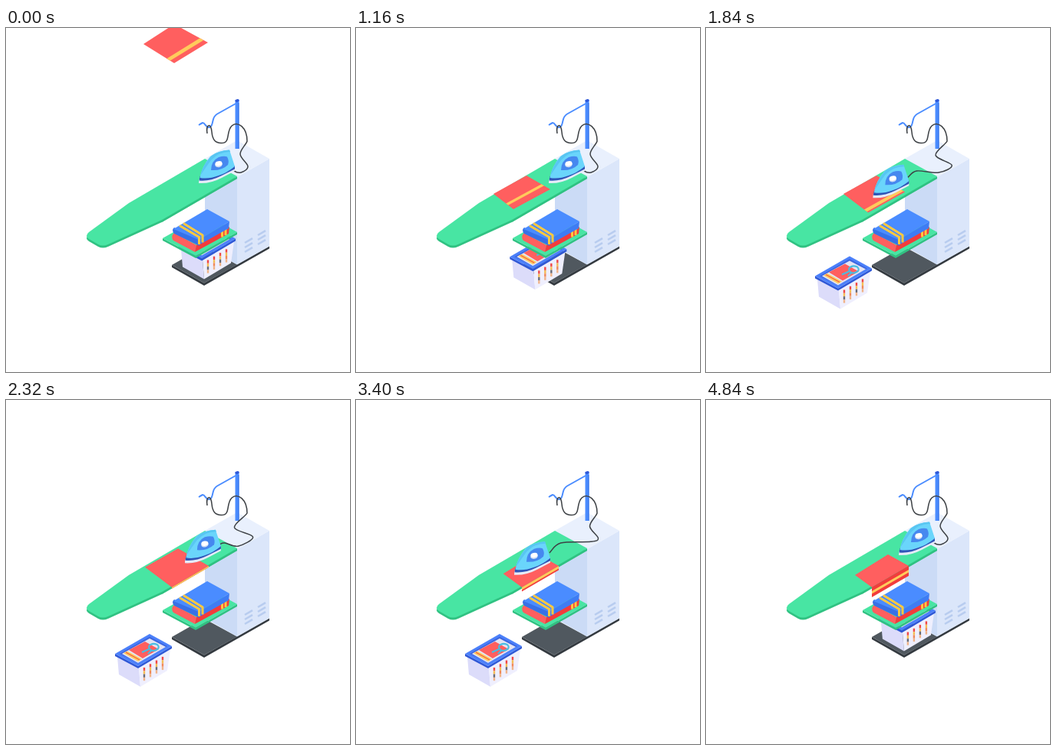
Write an HTML page with a canvas that moves like this. It is 448x450 px and loops after 4880 ms.

```html
<!DOCTYPE html>
<html lang="en">
<head>
<meta charset="utf-8">
<title>Ironing</title>
<style>
html, body { margin: 0; width: 100%; height: 100%; overflow: hidden; background: #fff; }
canvas { display: block; width: 448px; height: 450px; }
</style>
</head>
<body>
<canvas id="stage"></canvas>
<script>
const LOOP = 4880;
const canvas = document.getElementById('stage');
const g = canvas.getContext('2d');
const ratio = window.devicePixelRatio || 1;
canvas.width = 448 * ratio;
canvas.height = 450 * ratio;

const RED = '#ff5f5f', RED_SIDE = '#f23c3c', YELLOW = '#ffcb5c', GOLD = '#ffc93f';
const GREEN = '#48e5a3', GREEN_SIDE = '#30c282';
const BLUE = '#4a8cff', BLUE_SIDE = '#3871e6', NAVY = '#2f58d6';

const mix = (a, b, u) => a + (b - a) * u;
const mixPoint = (p, q, u) => [mix(p[0], q[0], u), mix(p[1], q[1], u)];

// Eased progress from 0 to 1 between two times.
function phase(t, from, to) {
  const u = Math.min(1, Math.max(0, (t - from) / (to - from)));
  return .5 - .5 * Math.cos(Math.PI * u);
}

function fill(d, color) {
  g.fillStyle = color;
  g.fill(new Path2D(d));
}
function line(d, color, width) {
  g.strokeStyle = color;
  g.lineWidth = width;
  g.stroke(new Path2D(d));
}
function poly(color, ...points) {
  fill('M' + points.join(' ') + 'Z', color);
}
function ellipse(x, y, rx, ry, color) {
  g.beginPath();
  g.ellipse(x, y, rx, ry, -.2, 0, 7);
  g.fillStyle = color;
  g.fill();
}
function shifted(x, y, draw) {
  g.save();
  g.translate(x, y);
  draw();
  g.restore();
}

function cabinet() {
  fill('M216 310L258 333.5L343 285.5V288.5L258 337L216 313Z', '#343a40');
  fill('M216 310L258 286L301 309.5L258 333.5Z', '#50585f');
  fill('M259 171L301 195V309.5L259 285.5Z', '#cbdbf6');
  fill('M301 195L343 171V285.5L301 309.5Z', '#dbe6fa');
  fill('M301 147L343 171L301 195L259 171Z', '#e9f0fd');
  for (let i = 0; i < 6; i++) {
    const x = 311 + 17 * (i % 2), y = 281 - 10 * (i % 2) + 6 * (i >> 1);
    line(`M${x} ${y}l10 -5.8`, '#b8ccef', 2.6);
  }
}

function basket() {
  fill('M145 336L173 350L175 375L147 359Z', '#dcdcfa');
  fill('M173 350L214 326L210 354L175 375Z', '#efeffe');
  for (let i = 0; i < 4; i++) {
    const x = 180 + 8 * i, y = 350 - 4.7 * i;
    ['#ef4848', '#f6bd55', i % 2 ? '#f08a5a' : '#6a6c76', '#f0b48a'].forEach((color, k) =>
      line(`M${x} ${y + 4.3 * k}v4.3`, color, 2.4));
  }
  fill('M142 332L172 348L216 322V325L172 351L142 335Z', NAVY);
  fill('M142 332L187 306L216 322L172 348Z', '#4b80fa');
  fill('M148 332L187 309.5L210 322L172 344Z', '#3d66e0');
  fill('M151 332L187 312L208 323L172 344Z', '#e3e4f3');
  fill('M160 327L181 316L199 326L178 338Z', RED);
  fill('M153 331L158 328.5L177 339L172 342Z', YELLOW);
  line('M156 330l18 10', RED_SIDE, 1);
  line('M186 326l-9 4M190 327l-5 5M186 322Q190 317 197 320Q202 325 193 328Q186 328 186 322', '#48bde2', 2);
}

function shelf() {
  fill('M204 275L247 298L301 267V270L247 301L204 278Z', GREEN_SIDE);
  fill('M204 275L259 244L301 267L247 298Z', GREEN);
  fill('M219 268L248 284L246 293L218 278Q214 273 219 268Z', RED);
  fill('M248 284L291 260L290 269L246 293Z', RED_SIDE);
  line('M281.5 264.5v9M286 262v9', GOLD, 3);
  fill('M219 261L252 277V285L219 269Q215 264 219 261Z', BLUE_SIDE);
  fill('M251 277L291 253L290 262L251 284Z', '#3e7cf4');
  fill('M218 263L262 237L291 253L251 277Z', BLUE);
  line('M226 258.5L251.5 273.5V283M231 255.5L256 271V280.5', GOLD, 3);
}

function board() {
  const edge = 'M259 171L301 194L203 251L133 283Q126 286 120 283L108 276Q102 272 108 267L160 229Z';
  shifted(0, 3, () => fill(edge, GREEN_SIDE));
  fill('M301 194V197L203 254V251Z', GREEN_SIDE);
  fill(edge, GREEN);
}

function pole() {
  line('M301 94V158', BLUE, 5);
  line('M302.7 98V158', '#3b78ec', 1.4);
  ellipse(301, 95, 2.6, 1.8, NAVY);
  line('M299 99L275 112.5C267 117 271 126 266 129.5C260 132 260 124 256 124Q254 125 251 127', BLUE, 2);
}

// Corners run far left, far right, near right, near left.
const AIR = [[179, 21], [219, -5], [263, 19], [219, 46]];
const FLAT = [[179, 217], [222, 193], [253, 211], [205, 237]];
const FOLDED = [[194, 229], [237, 202], [264, 217], [216, 245]];

function cloth(t) {
  const fall = phase(t, 0, 1040);
  const near = phase(t, 1300, 2300), far = phase(t, 1800, 3950);
  const hang = phase(t, 3400, 4200);
  const [a, b, c, d] = FLAT.map((p, i) =>
    mixPoint(mixPoint(AIR[i], p, fall), FOLDED[i], i < 2 ? far : near));
  poly(RED, a, b, c, d);

  const top = mix(.24, .37, fall) * (1 - near), low = Math.max(0, top - .11);
  poly(YELLOW, mixPoint(d, a, top), mixPoint(c, b, top), mixPoint(c, b, low), mixPoint(d, a, low));

  const drop = 5.5 * phase(t, 2000, 2840) + 7.5 * hang;
  const band = (from, to, color) =>
    poly(color, d[0], d[1] + from, c[0], c[1] + from, c[0], c[1] + to, d[0], d[1] + to);
  band(0, drop, RED_SIDE);
  band(5 * hang, Math.min(5 * hang + 3.4, drop), YELLOW);
}

// The loose end bows out midway through the iron's travel.
function cord(dx, dy) {
  const pull = -dx / 46, bow = Math.sin(Math.PI * pull);
  const p = [
    [313, 138], [314, 148],
    [305 - 8 * bow, 165 + 2 * bow],
    [315 + 7 * bow, 181 - 2 * bow],
    [306 - 4 * bow, 189 - 4 * pull + 4 * bow],
    [mix(297, 266, pull), 187],
    [295 + 2 * pull + dx, 182 - 8 * pull + dy],
    [288 + dx, 182 + dy]
  ];
  let d = 'M262 138C260 126 267 123 268 136C269 147 273 150 280 150.5C293 151 286 136 294 128C302 121 314 130 314 148';
  for (let i = 1; i < p.length - 2; i++) {
    const [a, b, c, e] = p.slice(i - 1, i + 3);
    const out = [0, 1].map(k => b[k] + (c[k] - a[k]) / 6);
    const into = [0, 1].map(k => c[k] - (e[k] - b[k]) / 6);
    d += 'C' + [out, into, c].join(' ');
  }
  line(d, '#3d4145', 1.5);
}

function iron() {
  fill('M251.5 198L251 203Q266 204 281 196L298 187V183Z', '#e6ebf8');
  fill('M252.5 194L251.5 199.5Q265 201 280 193.5L298 184.5V180Z', '#2f55b8');
  fill('M252.5 196Q255 181 266 168Q276 160 291 159.5L298 181Q287 190 277 193Q264 198 252.5 196Z', '#6ad5fb');
  fill('M253 193Q257 178 268 167Q278 160 291 159.5L292 162Q277 162 267 173Q259 184 253 193Z', '#58c6f2');
  fill('M267 186Q267 174 277 169Q284 167 288 168.5Q291 174 289 179Q281 187 267 186Z', '#4688ef');
  ellipse(277, 178.8, 4.8, 3.4, '#cfdcf3');
  ellipse(277, 177.3, 4.6, 3.1, '#fff');
}

function draw(t) {
  g.setTransform(ratio, 0, 0, ratio, 0, 0);
  g.fillStyle = '#fff';
  g.fillRect(0, 0, 448, 450);
  g.lineJoin = 'round';

  const stowed = 1 - phase(t, 860, 1680) + phase(t, 4060, 4860);
  const hop = 7.5 * Math.sin(Math.PI * Math.min(1, Math.max(0, (t - 1680) / 320)));
  const stroke = 45 - 17 * (1 - Math.cos(2 * Math.PI * (t - 3400) / 800));
  const dx = -stroke * phase(t, 1300, 2100) * (1 - phase(t, 4200, 4480));
  const dy = -.57 * dx;

  cabinet();
  shifted(83 * stowed, -46.5 * stowed - hop, basket);
  shelf();
  board();
  pole();
  cloth(t);
  cord(dx, dy);
  shifted(dx, dy, iron);
}

const start = performance.now();
function tick() {
  draw((performance.now() - start) % LOOP);
  requestAnimationFrame(tick);
}
tick();
</script>
</body>
</html>
```
